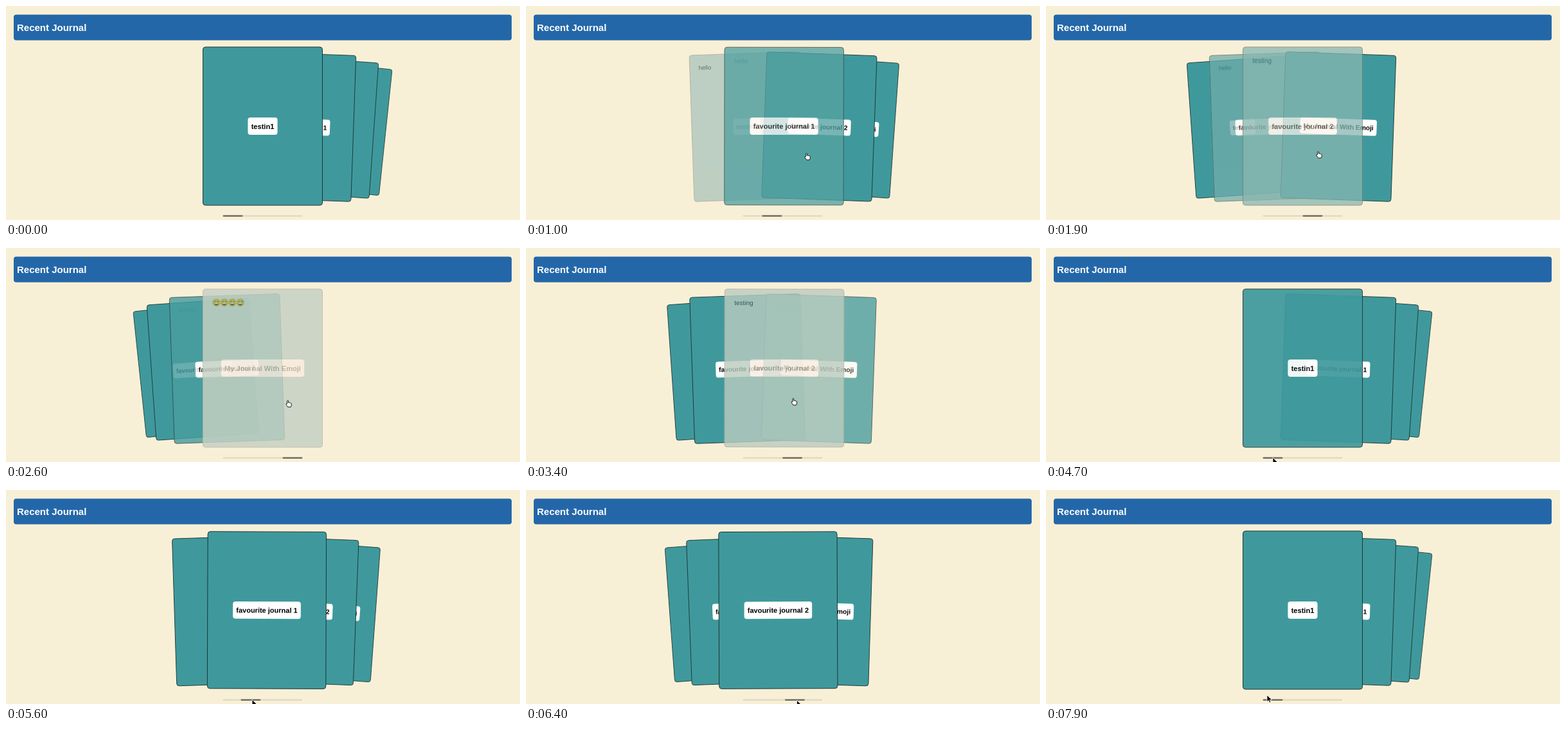
Write an HTML page that moves like this. It is 800 px wide and 334 px high and loops after 8 s.

```html
<!DOCTYPE html>
<html lang="en">
<head>
<meta charset="utf-8">
<title>Recent Journal</title>
<style>
  html, body { margin: 0; width: 100%; height: 100%; overflow: hidden; background: #f8f0d6; }
  svg { display: block; width: 800px; height: 334px; font-family: "Liberation Sans", Arial, sans-serif; }
  .heading { font: bold 15px "Liberation Sans", Arial, sans-serif; fill: #fff; }
  .label { font-size: 11.1px; font-weight: bold; text-anchor: middle; }
  .note { font-size: 10px; fill: #222; }
</style>
</head>
<body>
<svg viewBox="0 0 800 334">
  <defs>
    <g id="face">
      <circle r="5.9" fill="#f9c22f" stroke="#d99a1f" stroke-width=".5"/>
      <path d="M-3.6-1.2q1.2-1.8 2.4 0M1.2-1.2q1.2-1.8 2.4 0" fill="none" stroke="#5b3a12"/>
      <path d="M-3.8 .9H3.8Q3 4.6 0 4.6T-3.8 .9Z" fill="#70401a"/>
      <path d="M-3.2 1H3.2L2.7 2.2H-2.7Z" fill="#fff"/>
    </g>
  </defs>
  <rect x="12" y="13.5" width="775" height="40" rx="4" fill="#2467a9"/>
  <text class="heading" x="17" y="38.5">Recent Journal</text>
  <g id="deck"></g>
  <rect x="337.5" y="326.5" width="124" height="2.2" rx="1.1" fill="#000" fill-opacity=".1"/>
  <rect id="thumb" x="337.5" y="326.5" width="31" height="2.2" rx="1.1" fill="#000" fill-opacity=".54"/>
  <g id="cursor">
    <path id="hand" fill="#fff" stroke="#111" stroke-linejoin="round"
      d="M-2.4 0V-4.6Q-1.4-6-.5-4.6V-1.6Q.6-2.4 1.2-1.3 2.2-2 2.8-.8 4.2-1.2 4.3.4V2Q4 3.6 3.2 5.2H-1.4Q-2.6 3.4-4 1.4-4.4-.4-2.4 0Z"/>
    <path id="arrow" stroke="#fff" stroke-width=".8" d="M0-1V9.6L2.4 7.4 4 11 5.9 10.2 4.3 6.7H7.6Z"/>
  </g>
</svg>
<script>
const LOOP = 8000, STEP = 100, SNAP = 300, FADE = 600, PULL = 0.12;

// open: spans of time during which the cover is hovered
const cards = [
  { title: 'testin1', note: 'hello', open: [[120, 780], [4050, 4200]] },
  { title: 'favourite journal 1', note: 'hello', open: [[780, 1580], [3570, 4050]] },
  { title: 'favourite journal 2', note: 'testing', open: [[1580, 2180], [3000, 3570]] },
  { title: 'My Journal With Emoji', note: '', open: [[2180, 3000]] },
];

// start, release, from, to
const swipes = [
  [500, 780, 0, 1], [1330, 1580, 1, 2], [2000, 2180, 2, 3],
  [2820, 3000, 3, 2], [3380, 3570, 2, 1], [3890, 4050, 1, 0],
];
const scrub = [[5150, 0], [5600, 0.9], [6400, 2.11], [6800, 3], [7250, 3], [7700, 0]];
const pointer = [
  [100, 470, 300], [300, 480, 236], [500, 478, 235], [780, 400, 235], [1300, 490, 235],
  [1580, 415, 232], [1900, 425, 232], [2000, 480, 238], [2180, 420, 242], [2600, 440, 243],
  [2820, 395, 240], [3000, 480, 240], [3380, 410, 240], [3570, 480, 240], [3860, 426, 239],
  [3900, 427, 239], [4050, 490, 245], [4350, 410, 306], [4700, 353, 328], [5150, 354, 328],
  [5600, 383, 328], [6400, 421.5, 329], [6800, 449, 329], [7250, 449, 328], [7700, 354, 327],
  [7900, 344, 321],
];

const deck = document.getElementById('deck');
const thumb = document.getElementById('thumb');
const cursor = document.getElementById('cursor');
const hand = document.getElementById('hand');
const arrow = document.getElementById('arrow');

const clamp = v => Math.min(1, Math.max(0, v));
const mix = (a, b, k) => a + (b - a) * k;
const smooth = v => { const k = clamp(v); return k * k * (3 - 2 * k); };
const easeOut = v => 1 - (1 - clamp(v)) ** 2.4;

function track(points, t, column = 1) {
  if (t <= points[0][0]) return points[0][column];
  for (let i = 1; i < points.length; i++) {
    const a = points[i - 1], b = points[i];
    if (t < b[0]) return mix(a[column], b[column], (t - a[0]) / (b[0] - a[0]));
  }
  return points[points.length - 1][column];
}

const faces = [0, 1, 2, 3]
  .map(i => `<use href="#face" x="${-72 + i * 12.4}" y="-102.5"/>`).join('') +
  '<path d="M-31-106q2 2.6 0 3.6-2.2-1 0-3.6Z" fill="#4aa8e0"/>';

for (const card of cards) {
  const g = document.createElementNS('http://www.w3.org/2000/svg', 'g');
  g.innerHTML = `
    <g><rect x="-93.5" y="-124" width="187" height="248" rx="4" fill="#f6e5d2"/>
      ${card.note ? `<text class="note" x="-78" y="-98.5">${card.note}</text>` : faces}</g>
    <g><rect x="-93" y="-123.5" width="186" height="247" rx="4" fill="#3f999c" stroke="#1d3435"/>
      <rect y="-13.5" height="27" rx="4" fill="#fff"/>
      <text class="label" y="4">${card.title}</text></g>`;
  deck.append(g);
  [card.page, card.cover] = g.children;
  const width = g.querySelector('.label').getComputedTextLength() + 10.4;
  const plate = card.cover.children[1];
  plate.setAttribute('x', -width / 2);
  plate.setAttribute('width', width);
  card.node = g;
}

// x, y, rotation and scale of a card at distance p from the front
function pose(p, direction) {
  const d = Math.abs(p);
  const depth = 12 / (12 + d);
  const pulled = p * direction > 0 && d < 1;
  const lift = pulled ? Math.sqrt(1 - Math.abs(d - 0.5) / 0.5) : 0;
  return [
    399.5 - p * (65.8 - 5.65 * d + 803 * lift) * depth,
    198.5 - (11 + 62 * lift * d) * depth,
    -p * (2 + 28 * lift),
    depth * (1 - 0.5 * lift * d),
  ];
}

function deckState(t) {
  const swipe = swipes.filter(s => t >= s[0]).pop();
  if (!swipe || t >= scrub[0][0]) {
    const progress = track(scrub, t);
    return { progress, front: progress, place: i => pose(progress - i, 0) };
  }
  const [start, release, from, to] = swipe;
  const direction = to - from;
  const dragged = from + direction * PULL * clamp((t - start) / (release - start));
  const k = easeOut((t - release) / SNAP);
  return {
    progress: mix(dragged, to, k),
    front: t < release ? dragged : to,
    place: i => {
      const end = pose(to - i, 0);
      return pose(dragged - i, direction).map((v, n) => mix(v, end[n], k));
    },
  };
}

let order = '';
function stack(front) {
  const rank = i => Math.abs(Math.round(front) - i);
  const sorted = cards.map((_, i) => i).sort((a, b) => rank(b) - rank(a) || a - b);
  if (sorted.join() === order) return;
  order = sorted.join();
  sorted.forEach(i => deck.append(cards[i].node));
}

function draw(t) {
  const state = deckState(t);
  stack(state.front);
  cards.forEach((card, i) => {
    const [x, y, turn, size] = state.place(i);
    card.node.setAttribute('transform', `translate(${x} ${y}) rotate(${turn}) scale(${size})`);
    const shown = card.open.reduce(
      (sum, [a, b]) => sum + smooth((t - a) / FADE) - smooth((t - b) / FADE), 0);
    card.page.setAttribute('opacity', clamp(shown));
    card.cover.setAttribute('opacity', 1 - clamp(shown));
  });
  thumb.setAttribute('x', 337.5 + 31 * state.progress);

  const x = track(pointer, t, 1), y = track(pointer, t, 2);
  const onCard = y < 311 && t < 4700;
  cursor.setAttribute('transform', `translate(${x} ${y})`);
  cursor.style.display = t < 100 ? 'none' : '';
  hand.style.display = onCard ? '' : 'none';
  arrow.style.display = onCard ? 'none' : '';
}

const begin = performance.now();
function tick() {
  const t = (performance.now() - begin) % LOOP;
  draw(Math.floor(t / STEP) * STEP);
  requestAnimationFrame(tick);
}
tick();
</script>
</body>
</html>
```
